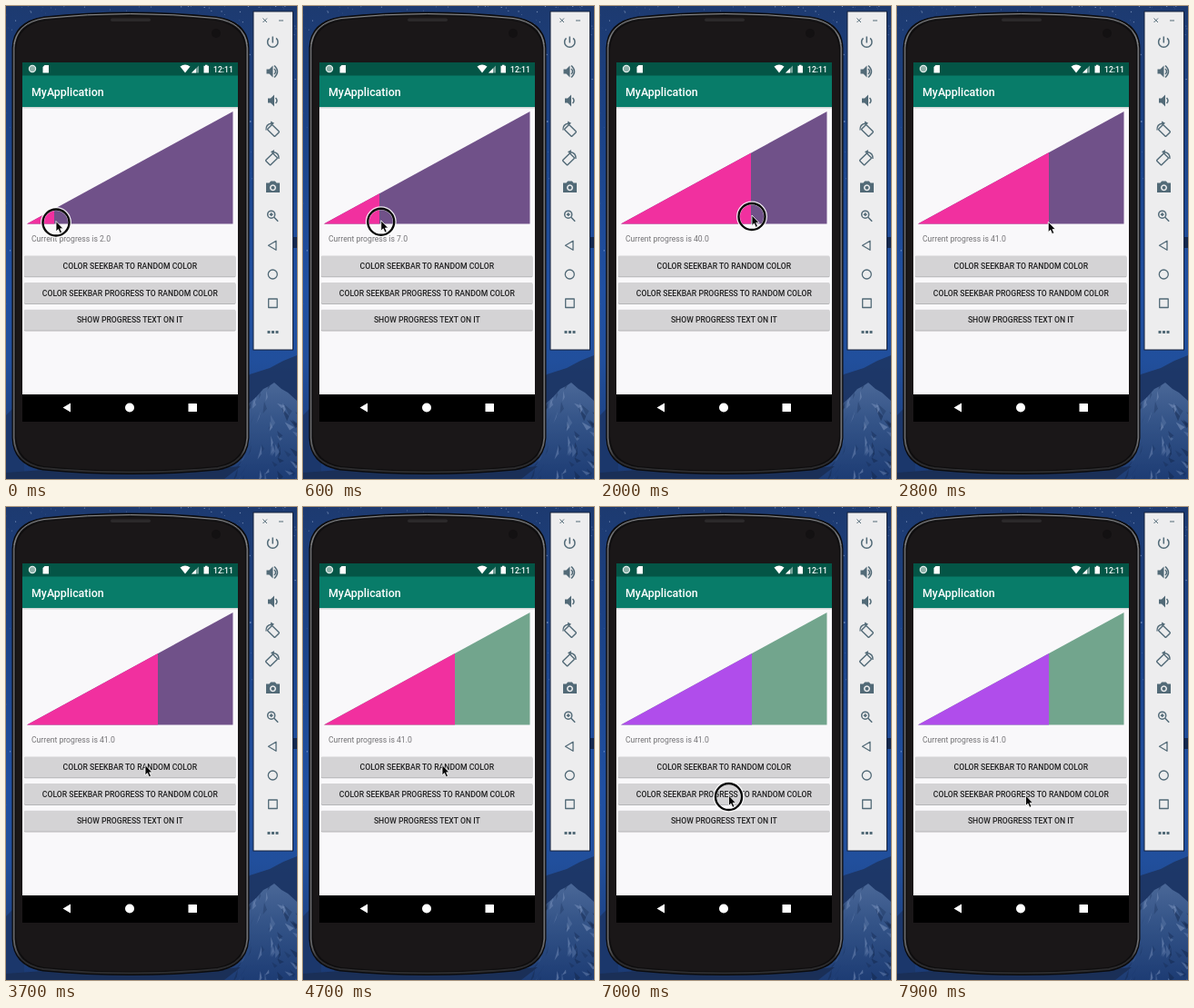
Write an HTML page that moves like this. It is 320 px wide and 520 px high and loops after 8 s.

```html
<!DOCTYPE html>
<html lang="en">
<head>
<meta charset="utf-8">
<title>Triangle seek bar</title>
<style>
html, body { margin: 0; width: 100%; height: 100%; overflow: hidden; background: #1b4488; }
svg { display: block; width: 320px; height: 520px; }
text { font-family: Roboto, "Noto Sans", sans-serif; font-size: 8.64px; }
.medium { font-weight: 500; }
.tools { fill: none; stroke: #526a77; stroke-width: 1.5; stroke-linejoin: round; }
.tools .solid { fill: #526a77; stroke: none; }
</style>
</head>
<body>
<svg viewBox="0 0 320 520">
  <defs>
    <linearGradient id="sky" x2="0" y2="1">
      <stop offset="0" stop-color="#1d3a70"/>
      <stop offset=".25" stop-color="#1b4286"/>
      <stop offset=".6" stop-color="#2050a2"/>
      <stop offset=".75" stop-color="#214f9c"/>
      <stop offset="1" stop-color="#1b3a73"/>
    </linearGradient>
    <linearGradient id="rock" x2="0" y2="1">
      <stop offset="0" stop-color="#4a6797"/>
      <stop offset=".4" stop-color="#345488"/>
      <stop offset="1" stop-color="#1d3c74"/>
    </linearGradient>
    <linearGradient id="rim">
      <stop offset="0" stop-color="#66676a"/>
      <stop offset=".03" stop-color="#2c2c2e"/>
      <stop offset=".97" stop-color="#2c2c2e"/>
      <stop offset="1" stop-color="#707174"/>
    </linearGradient>
    <clipPath id="wedge"><path d="M23 239.5L249.5 116V239.5Z"/></clipPath>
    <clipPath id="slope"><path id="mountain" d="M250 452L266 438L275 430L283 421L289 418L295 414L303 421L310 425L320 434V520H240Z"/></clipPath>
  </defs>

  <rect width="320" height="520" fill="url(#sky)"/>
  <g id="stars" fill="#c4d5f4"/>
  <path d="M0 450L8 442L20 470V520H0Z" fill="#1b376b"/>
  <path d="M255 420L268 405L290 398L305 390L320 384V450H255Z" fill="#1c3159" opacity=".75"/>
  <use href="#mountain" fill="url(#rock)"/>
  <g id="crags" clip-path="url(#slope)"/>
  <path d="M0 513L55 509Q137 518 220 509L258 506L240 520H0Z" fill="#1a2f57"/>

  <path d="M8 46Q9 18 42 13Q137 3 231 13Q265 18 266 46V475Q264 504 233 509Q137 518 41 509Q9 504 8 475Z" fill="#0e0d0e" stroke="#0b0b0d" stroke-width="3"/>
  <path d="M8.7 46Q10 19 42 14Q137 4 231 14Q264 19 265.3 46V475Q263 503 233 508Q137 517 41 508Q10 503 8.7 475Z" fill="none" stroke="url(#rim)" stroke-width="1.8"/>
  <path d="M9 42Q13 18 42 13.5Q137 3.5 231 13.5Q261 18 265 42" fill="none" stroke="#858688" stroke-width="1"/>
  <path d="M11 47Q13 21 43 16Q137 6 230 16Q261 21 263 47V474Q261 501 232 506Q137 515 42 506Q13 501 11 474Z" fill="#1a1718"/>
  <rect x="115" y="13.5" width="44" height="3.5" rx="1.7" fill="#2b292a"/>
  <circle cx="231" cy="30" r="5" fill="#131112"/>

  <rect x="18" y="62" width="237" height="395" fill="#f9f8fa"/>
  <rect x="18" y="111" width="237" height="1.5" fill="#d2d8d7"/>
  <rect x="18" y="76" width="237" height="35" fill="#087c69"/>
  <rect x="18" y="62" width="237" height="14.5" fill="#045546"/>
  <rect x="18" y="427" width="237" height="30"/>
  <g fill="#fff">
    <circle cx="29" cy="69" r="3.6" fill="#8eb1aa" stroke="#e5efed" stroke-width="1.2"/>
    <path d="M42.5 65H47V73.5H40.5V67Z"/>
    <path d="M191.5 66.5Q197 62.5 202.5 66.5L197 73.5Z"/>
    <path d="M204 73.5L212 65.5V73.5Z" opacity=".45"/>
    <path d="M204 73.5L209 68.5V73.5Z"/>
    <path d="M217.5 65.8H219V64.8H221.5V65.8H223V73.5H217.5Z"/>
    <text x="228" y="72.5" class="medium">12:11</text>
    <text x="28" y="98.6" class="medium" style="font-size:12.4px">MyApplication</text>
    <path d="M62.5 441.5L71 436.5V446.5Z"/>
    <circle cx="136" cy="441.5" r="5"/>
    <rect x="200.5" y="437" width="9.5" height="9" rx=".6"/>
  </g>

  <g clip-path="url(#wedge)">
    <rect id="rest" x="23" y="116" width="227" height="124"/>
    <rect id="done" x="23" y="116" height="124"/>
  </g>
  <text id="label" x="28" y="258.5" fill="#737275"></text>
  <g id="buttons"></g>

  <rect x="272" y="6" width="43.5" height="372" fill="#ededee" stroke="#15203a" stroke-width="1"/>
  <g class="tools">
    <path d="M282.5 13.5l4.5 4.5m0-4.5l-4.5 4.5M300 16h5" stroke-width="1"/>
    <path d="M293.3 33.5v7M289.5 35.4a5.7 5.7 0 1 0 7.6 0"/>
    <path class="solid" d="M286.5 69.5h3l4-4v13l-4-4h-3Z"/>
    <path d="M295 69q3 3 0 6m0-9.5q7 6.5 0 13"/>
    <path class="solid" d="M288 101.5h3l4-4v13l-4-4h-3Z"/>
    <path d="M296.5 101q3 3 0 6"/>
    <g id="turn">
      <rect x="290.3" y="131.3" width="7.4" height="11.4" rx=".8" transform="rotate(-45 294 137)" stroke-width="1.4"/>
      <path d="M286 136.5q-.5-6.5 6-7.5" stroke-width="1.3"/>
      <path class="solid" d="M291 126.5l4 2.2l-3.4 3Z"/>
    </g>
    <use href="#turn" transform="translate(586 31.5) scale(-1 1)"/>
    <path class="solid" fill-rule="evenodd" d="M286 194.5h3.5l1.7-2h4.6l1.7 2h3.5v10.5h-15Zm7.5 1.7a3.5 3.5 0 1 0 .01 0Z"/>
    <circle class="solid" cx="293.5" cy="199.7" r="2"/>
    <circle cx="291.7" cy="229.2" r="4"/>
    <path d="M294.8 232.3l4.4 4.4M289.8 229.2h3.8m-1.9-1.9v3.8"/>
    <path d="M288.5 263.3l8.5-5v10Z" stroke-width="1.3"/>
    <circle cx="293.3" cy="295" r="5" stroke-width="1.3"/>
    <rect x="288.7" y="322" width="9.5" height="9.5" stroke-width="1.3"/>
    <path class="solid" d="M287.5 357h3v3h-3ZM292 357h3v3h-3ZM296.5 357h3v3h-3Z"/>
  </g>
  <path d="M315.8 254h4.2v12h-4.2Z" fill="#13284f"/>

  <g id="pointer">
    <g id="ring" fill="none">
      <circle r="15" stroke="#fff" stroke-width="4" opacity=".85"/>
      <circle r="14.5" stroke="#090909" stroke-width="2.4"/>
    </g>
    <path d="M0-1.5V10L2.5 7.6L4.3 11.8L6.5 10.8L4.7 6.8H8Z" fill="#080808" stroke="#fff" stroke-width=".8"/>
  </g>
</svg>
<script>
const $ = id => document.getElementById(id);
const svgNode = (parent, tag, attrs, text = '') => {
  const node = document.createElementNS('http://www.w3.org/2000/svg', tag);
  for (const name in attrs) node.setAttribute(name, attrs[name]);
  node.textContent = text;
  parent.append(node);
};

let seed = 7;
const random = () => (seed = seed * 16807 % 2147483647) / 2147483647;
for (let i = 0; i < 320; i++)
  svgNode($('stars'), 'circle', {
    cx: random() * 320, cy: random() ** 1.8 * 380,
    r: .25 + random() * .45, opacity: .2 + random() * .6
  });

// Snow and shadow running down both flanks of the peak
for (let i = 0; i < 90; i++) {
  const x = 245 + random() * 75, y = 412 + random() * 108;
  const fall = 5 + random() * 12, lean = (x - 294) * .25 + random() * 8 - 4;
  svgNode($('crags'), 'path', {
    d: `M${x} ${y}l${lean} ${fall}l${2 + random() * 3} ${-fall * .4}Z`,
    fill: i % 2 ? '#7b93bd' : '#15294f', opacity: .25 + random() * .35
  });
}

['COLOR SEEKBAR TO RANDOM COLOR', 'COLOR SEEKBAR PROGRESS TO RANDOM COLOR', 'SHOW PROGRESS TEXT ON IT']
  .forEach((caption, i) => {
    const y = 274.5 + i * 29.6;
    const box = { x: 20, width: 232.5, height: 22.8, rx: 1.3 };
    svgNode($('buttons'), 'rect', { ...box, y: y + 1, fill: '#b5b5b7' });
    svgNode($('buttons'), 'rect', { ...box, y, fill: '#d4d3d5' });
    svgNode($('buttons'), 'text', {
      x: 136.3, y: y + 14.5, 'text-anchor': 'middle', class: 'medium', fill: '#202021'
    }, caption);
  });

// Pointer path: time, x, y
const path = [
  [0, 55, 238], [1200, 116.5, 236.5], [2000, 167, 231.5], [2200, 168.5, 231],
  [2700, 168.5, 231], [3400, 153, 285], [5000, 153, 285], [5700, 141.5, 318.5], [8000, 141.5, 318.5]
];
const RELEASE = 2600, CLICK_REST = 4200, CLICK_DONE = 7000;

function pointerAt(t) {
  const i = path.findIndex(p => p[0] > t);
  const [a, b] = [path[i - 1], path[i]];
  const k = (t - a[0]) / (b[0] - a[0]);
  return [a[1] + (b[1] - a[1]) * k, a[2] + (b[2] - a[2]) * k];
}

function draw(now) {
  const t = Math.floor(now % 8000 / 100) * 100;
  const [x, y] = pointerAt(t);
  const split = pointerAt(Math.min(t, 2200))[0] * 1.01 - 2.5;
  // Progress is the share of the triangle's area
  const progress = Math.round(((split - 23) / 226.5) ** 2 * 100);
  const pressed = t < RELEASE || [CLICK_REST, CLICK_DONE].some(c => t >= c - 100 && t < c + 100);

  $('done').setAttribute('width', Math.floor(split) - 23);
  $('done').setAttribute('fill', t < CLICK_DONE ? '#f1309f' : '#b04deb');
  $('rest').setAttribute('fill', t < CLICK_REST ? '#705189' : '#72a58d');
  $('label').textContent = `Current progress is ${progress.toFixed(1)}`;
  $('pointer').setAttribute('transform', `translate(${x} ${y})`);
  $('ring').style.display = pressed ? '' : 'none';
}

const start = performance.now();
function tick() {
  draw(performance.now() - start);
  requestAnimationFrame(tick);
}
tick();
</script>
</body>
</html>
```
